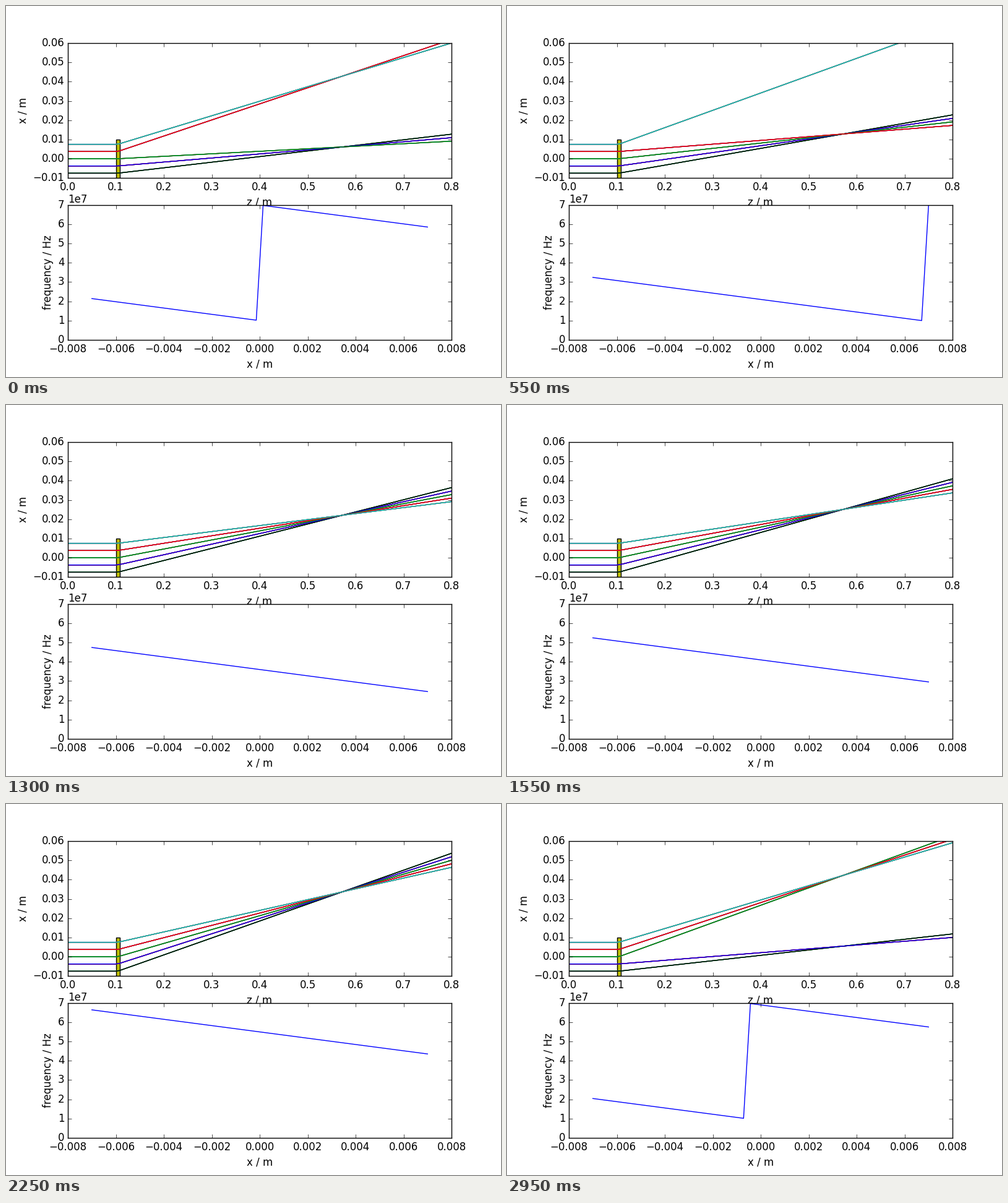
These frames come from a looping animation (800x600 px, 3000 ms). A matplotlib script:

```python
import numpy as np
import matplotlib.pyplot as plt
from matplotlib.animation import FuncAnimation
from matplotlib.patches import Rectangle

plt.style.use("classic")
plt.rcParams.update({
    "font.family": "DejaVu Sans",
    "figure.dpi": 100,
    "savefig.dpi": 100,
    "figure.facecolor": "white",
})

FRAMES = 60
STEP = 1e-6             # simulated seconds per frame
F_MIN, F_BAND = 1e7, 6e7
CHIRP = 1e12            # Hz / s
V = 612.0               # acoustic velocity, m / s
WAVELENGTH = 800e-9
Z_IN, Z_OUT, Z_END = 0.1, 0.108, 0.8
INDEX = 2.0             # slope reduction inside the crystal


def frequency(x, t):
    """Sawtooth chirp travelling along the crystal."""
    return F_MIN + np.mod(CHIRP * (t - x / V), F_BAND)


def ray_path(x, t):
    angle = WAVELENGTH * frequency(x, t) / V
    x_out = x + (Z_OUT - Z_IN) * angle / INDEX
    return [x, x, x_out, x_out + (Z_END - Z_OUT) * angle]


fig, (ax_rays, ax_freq) = plt.subplots(2, 1, figsize=(8, 6))
fig.subplots_adjust(left=0.125, right=0.9, bottom=0.1, top=0.9, hspace=0.2)

ax_rays.set(xlim=(0, 0.8), ylim=(-0.01, 0.06), xlabel="z / m", ylabel="x / m")
ax_rays.set_xticks(np.arange(9) / 10)
ax_rays.set_yticks(np.arange(-1, 7) / 100)
ax_rays.add_patch(Rectangle((Z_IN, -0.02), Z_OUT - Z_IN, 0.03,
                            facecolor="y", edgecolor="k"))

ax_freq.set(xlim=(-0.008, 0.008), ylim=(0, 7e7),
            xlabel="x / m", ylabel="frequency / Hz")
ax_freq.set_xticks(np.arange(-4, 5) * 0.002)
ax_freq.set_yticks(np.arange(8) * 1e7)

# A 5 x 5 bundle seen from the side: rows overlap and blend at the edges.
starts = np.tile(np.linspace(-0.0075, 0.0075, 5), 5)
z = [0, Z_IN, Z_OUT, Z_END]
rays = [ax_rays.plot(z, [x] * 4, color="bgrcmyk"[i % 7])[0]
        for i, x in enumerate(starts)]

xs = np.linspace(-0.007, 0.007, 50)
curve, = ax_freq.plot(xs, frequency(xs, 0), color="b")


def update(frame):
    t = frame * STEP
    for ray, x in zip(rays, starts):
        ray.set_ydata(ray_path(x, t))
    curve.set_ydata(frequency(xs, t))
    return [*rays, curve]


anim = FuncAnimation(fig, update, frames=FRAMES, interval=50,
                     init_func=lambda: update(0), repeat=True, repeat_delay=0)
plt.show()
```
